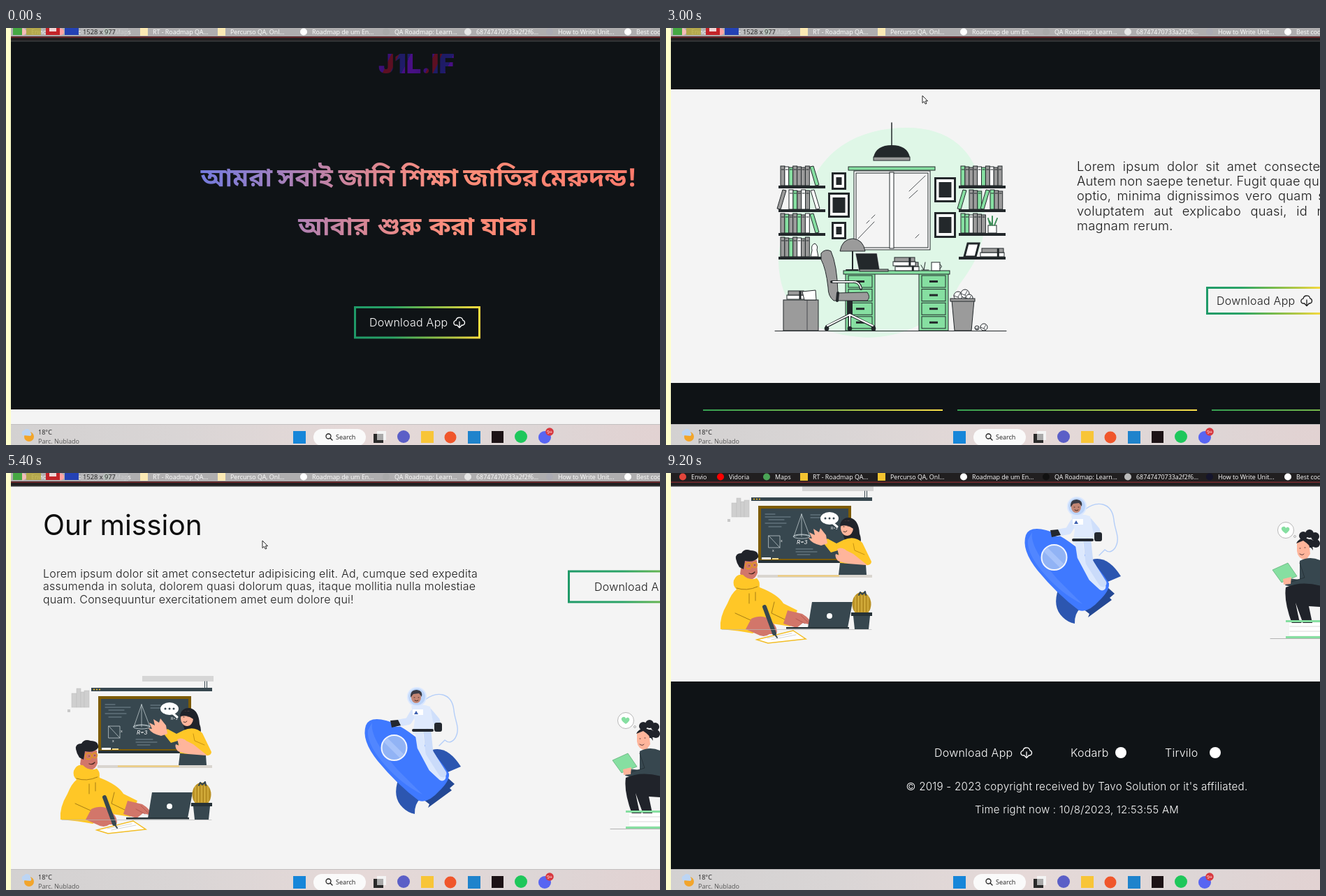
An HTML page that plays this animation: 936x598 px, repeating every 9300 ms.

```html
<!DOCTYPE html>
<html lang="en">
<head>
<meta charset="utf-8">
<style>
html, body { margin: 0; width: 100%; height: 100%; overflow: hidden; background: #f4f4f4; }
svg { display: block; width: 936px; height: 598px; font-family: Inter, "Open Sans", sans-serif; }
.body { font-weight: 300; letter-spacing: .015em; white-space: pre; }
.ui { font-family: "Open Sans", "Noto Sans", sans-serif; }
.title { font: 600 36px "Noto Sans Bengali", "Noto Serif Bengali", "Noto Sans", sans-serif; text-anchor: middle; }
</style>
</head>
<body>
<svg id="stage" viewBox="0 0 936 598"></svg>
<script>
const LOOP = 9300;
const DARK = '#0f1316', LIGHT = '#f4f4f4', INK = '#23282b', GREEN = '#86dfa1', GREY = '#9b9b9b';
const SLATE = '#37474f', YELLOW = '#ffc727', SKIN = '#d2766a', PALE = '#ffb59b';

const rect = (x, y, w, h, fill, more = '') => `<rect x="${x}" y="${y}" width="${w}" height="${h}" fill="${fill}" ${more}/>`;
const circle = (x, y, r, fill, more = '') => `<circle cx="${x}" cy="${y}" r="${r}" fill="${fill}" ${more}/>`;
const oval = (x, y, rx, ry, fill, more = '') => `<ellipse cx="${x}" cy="${y}" rx="${rx}" ry="${ry}" fill="${fill}" ${more}/>`;
const shape = (d, fill, more = '') => `<path d="${d}" fill="${fill}" ${more}/>`;
const line = (d, color, w = 1) => `<path d="${d}" fill="none" stroke="${color}" stroke-width="${w}" stroke-linecap="round" stroke-linejoin="round"/>`;
const text = (x, y, size, fill, s, more = 'class="body"') => `<text x="${x}" y="${y}" font-size="${size}" fill="${fill}" ${more}>${s}</text>`;
const group = (y, s) => `<g transform="translate(0 ${y})">${s}</g>`;
const edge = `stroke="${INK}" stroke-width="1"`;

const gradient = (id, stops, more = '') => `<linearGradient id="${id}" ${more}>` +
  stops.map(([at, c]) => `<stop offset="${at}" stop-color="${c}"/>`).join('') + '</linearGradient>';

const defs = '<defs>' +
  gradient('lime', [[0, '#1f9a68'], [.3, '#2ba467'], [.55, '#6fb84e'], [.8, '#b9c944'], [1, '#fddc3f']]) +
  gradient('rule', [[0, '#36a052'], [.4, '#6cb44c'], [.7, '#b7c745'], [1, '#fbe04a']]) +
  gradient('sunset', [[0, '#757bdc'], [.12, '#907eca'], [.22, '#ae80b4'], [.35, '#cf8499'], [.48, '#ee8b86'], [.6, '#ff8d78'], [1, '#ff7b6c']],
    'gradientUnits="userSpaceOnUse" x1="280" x2="898" y1="0" y2="0"') +
  gradient('head', [[0, '#4a6cf7'], [.25, '#7f7bcf'], [.5, '#cb7f98'], [.68, '#f47d78'], [1, '#ff7b6b']]) +
  gradient('bar', [[0, '#d3d1d1'], [.25, '#d9d5d5'], [.55, '#e6d9d8'], [.8, '#ddd6d6'], [1, '#e2d2d2']]) +
  gradient('neon', [[0, '#480f84'], [.3, '#391073'], [.3, '#5c0f22'], [.48, '#5c0f22'], [.48, '#1e1c62'], [.75, '#1f1b6c'], [.75, '#480f84'], [1, '#480f84']],
    'gradientUnits="userSpaceOnUse" x1="533" y1="38" x2="583" y2="62" spreadMethod="repeat"') +
  `<clipPath id="view"><rect x="7" y="19" width="929" height="549"/></clipPath></defs>`;

const cloud = (x, y, c) => `<g transform="translate(${x} ${y})">` +
  line('M-3 4H-4.5A3.4 3.4 0 0 1-5-2.8A5 5 0 0 1 4.8-3.2A3.7 3.7 0 0 1 4.5 4H3M0-1V7M-3 4.5L0 7.5L3 4.5', c, 1.3) + '</g>';
const button = (x, y, w, h, tx, c) =>
  rect(x + 1.5, y + 1.5, w - 3, h - 3, 'none', 'stroke="url(#lime)" stroke-width="3"') +
  text(tx, y + h / 2 + 5.5, 16, c, 'Download App') + cloud(tx + 129, y + h / 2, c);

// Hero
const words = [['আমরা', 330], ['সবাই', 428], ['জানি', 516], ['শিক্ষা', 606], ['জাতির', 708], ['মেরুদন্ড!', 834]];
const words2 = [['আবার', 469], ['শুরু', 563], ['করা', 638], ['যাক।', 720]];
const title = (list, y) => list.map(([s, x]) => text(x, y, 36, 'url(#sunset)', s, 'class="title"')).join('');
const hero = rect(7, 0, 929, 547, DARK) +
  text(533, 65, 38, 'url(#neon)', 'J1L.IF', 'font-weight="900"') +
  title(words, 227) + title(words2, 297) + button(498, 399, 181, 46.5, 520, '#fff');

// Study room
const tone = { g: GREEN, a: GREY, w: '#fff' };
const books = (x, y, list) => [...list].map((k, i) =>
  rect(x + i * 5.9, y - 28 + i % 3, 5.9, 28 - i % 3, tone[k], edge) + line(`M${x + i * 5.9 + 1.5} ${y - 23}h3`, INK)).join('');
const lean = (x, y, fill, dir = 1) => shape(`M${x} ${y - 27}l${5 * dir}-1l${8 * dir} 27l${-5 * dir} 1z`, fill, edge);
const picture = (x, y, w, h) => rect(x, y, w, h, INK) + rect(x + 3, y + 3, w - 6, h - 6, '#fff') + rect(x + 6.5, y + 7, w - 13, h - 14, INK);
const drawers = x => rect(x, 352, 42, 82, GREEN, edge) + [0, 1, 2, 3].map(i =>
  rect(x + 4, 355 + i * 19.6, 34, 17, GREEN, edge) + rect(x + 15, 362 + i * 19.6, 12, 3, INK)).join('');
const pile = (x, y, w) => rect(x, y - 6, w, 6, '#fff', edge) + rect(x + 2, y - 12, w - 3, 6, GREY, edge) + rect(x + w * .7, y - 12, 3, 12, INK);
const ball = (x, y, r) => circle(x, y, r, '#fff', edge) + line(`M${x - r} ${y}l${r} 2l${r / 2}-${r}M${x} ${y + 2}l2 ${r - 3}`, INK, .8);
const room =
  shape('M161 330C163 280 197 240 217 205C243 163 290 143 345 143C405 143 444 175 453 235C463 300 448 330 420 368C390 425 335 443 290 444C200 440 161 400 161 330Z', '#dff7e7') +
  line('M323 136V170', INK, 1.5) + shape('M297 185Q301 168 323 168Q345 168 349 185Z', INK) + rect(297, 185, 52, 5, GREY, edge) +
  rect(269, 205, 109, 113, '#fff', edge) + rect(272, 208, 103, 107, LIGHT, edge) + rect(320, 207, 6, 109, '#fff', edge) +
  line('M348 234L371 212M348 244L360 233M275 302L298 278M294 273L299 268M287 280L291 276M357 301L362 296', INK, .8) +
  rect(261, 199, 124, 5, GREEN, edge) +
  picture(237, 207, 21, 25) + picture(232, 236, 31, 36) + picture(237, 278, 21, 25) + picture(384, 214, 31, 36) + picture(384, 264, 31, 37) +
  [227, 261, 295, 329].map(y => rect(161, y - 1, 67, 4, INK) + rect(419, y - 1, 67, 4, INK)).join('') +
  books(164, 226, 'awgaaaa') + lean(206, 226, GREEN) + books(176, 260, 'wgawa') + lean(172, 260, GREY, -1) + lean(207, 260, '#fff') +
  books(164, 294, 'agaagaw') + lean(206, 294, GREEN) + books(164, 328, 'aagawaa') +
  shape('M207 328l2-9q-2-8 4-10q5 3 3 9l2 10z', '#fff', edge) +
  books(422, 226, 'gaaawgawaa') + books(434, 260, 'aag') + lean(430, 260, GREEN, -1) + lean(463, 260, GREEN, -1) + books(464, 260, 'gaa') +
  books(422, 294, 'ggwaaa') + rect(461, 283, 12, 11, '#fff', edge) + line('M467 283V270M464 283L461 273M470 283L474 273M466 282L463 277', '#3f8f5a', 2) +
  shape('M432 309h16l-5 19h-16z', '#fff', `stroke="${INK}" stroke-width="3"`) + pile(450, 328, 34) +
  rect(168, 390, 50, 44, GREY, edge) + line('M202 391V433', INK, .7) + pile(173, 389, 25) + shape('M195 378l19-2l1 14h-17z', '#fff', edge) +
  drawers(257) + drawers(362) + rect(254, 348, 152, 5, GREEN, edge) +
  line('M267 320V347M258 347H276', INK, 2) + shape('M249 320Q252 303 267 302Q282 303 285 320Z', GREY, edge) +
  shape('M271 323h31l4 25h-30z', INK, 'stroke="#fff" stroke-width=".6"') + rect(277, 346, 41, 3, GREY, edge) +
  pile(328, 348, 34) + pile(325, 341, 32) + line('M365 340l4 7l2-11M366 347h10', INK) + rect(380, 336, 12, 12, '#fff', edge) + line('M392 339q5 3 0 6', INK) +
  shape('M222 323Q228 316 236 320Q245 340 246 380L288 379Q293 386 288 391H240Q232 385 232 372Q229 345 222 332Z', GREY, edge) +
  line('M246 380L245 391M237 364H268Q277 363 279 374', INK, 4) + line('M239 364H267Q276 363 279 373', '#fff', 1.8) +
  rect(259, 391, 8, 24, INK) + line('M263 411L230 428M263 411L297 428M263 411V430', INK, 4) + line('M263 411L231 427M263 411L296 427M263 412V428', '#fff', 2) +
  [230, 263, 297].map(x => circle(x, 431, 3.3, INK)).join('') +
  ball(418, 384, 6) + ball(428, 381, 6) + ball(434, 387, 5) + ball(455, 429, 5) + ball(445, 430, 3) +
  shape('M409 390h32l-4 44h-24z', GREY, edge) + rect(407, 388, 35, 4, GREY, edge) + line('M156 434.5H487', INK);
const lorem = [['Lorem ipsum dolor sit amet consectetur', 5], ['Autem non saepe tenetur. Fugit quae quas', -.5],
  ['optio, minima dignissimos vero quam sed', 3], ['voluptatem aut explicabo quasi, id nam', 8], ['magnam rerum.', 0]];
const intro = rect(7, 547, 929, 421, LIGHT) + group(459, room) +
  lorem.map(([s, gap], i) => text(588, 663.5 + i * 21.4, 18.3, '#1c1c1c', s, `class="body" style="word-spacing:${gap}px"`)).join('') +
  button(773, 830, 168, 40, 788, '#1c1c1c');

// Cards
const para = ['Lorem ipsum dolor, sit amet consectetur', 'adipisicing elit. Explicabo, in facere atque', 'totam iste esse. Libero praesentium natus vel',
  'quibusdam? Magni provident obcaecati', 'earum, non quibusdam autem officia', 'numquam dolor nihil cum molestias vitae', 'pariatur.'];
const card = (x, s) => rect(x, 1006, 343, 2, 'url(#rule)') + text(x, 1049, 28, 'url(#head)', s, 'font-weight="350"') +
  para.map((p, i) => text(x, 1085.5 + i * 18.35, 15.5, '#f4f4f4', p, `class="body${i < 6 ? ' justify' : ''}"`)).join('');
const cards = rect(7, 968, 929, 229, DARK) + card(53, "We don't collect data") + card(417, 'Subscription not apply') + card(781, 'Spam &amp; ads free');

// Mission
const lesson =
  rect(195, 291, 102, 8, '#d6d6d6') + line('M284.5 299V308M287.5 299V308', SLATE) + rect(122, 308, 173, 5, SLATE) +
  [126, 130, 134].map(x => circle(x, 310.5, 1, YELLOW)).join('') +
  [[94, 316, 7], [101, 309, 6], [107, 314, 5], [112, 312, 7]].map(([x, y, w]) => rect(x, y, w, 336 - y, '#cfcfcf', 'stroke="#bdbdbd" stroke-width=".5"')).join('') +
  rect(88, 339, 4, 4, '#c8c8c8') +
  rect(132, 320, 133, 80, '#7d5b05') + rect(136, 324, 125, 72, SLATE) + rect(132, 398, 136, 4, '#263238') + rect(137, 394, 13, 3, '#fff') + rect(152, 395, 9, 2, '#f4d98a') +
  line('M194 332L183 364M194 332L206 364M194 332V364M183 364Q194 359 206 364M147 363h16v17h-16zM147 363l16 17', '#cfd8dc', .7) + oval(194, 364, 12, 3, 'none', 'stroke="#cfd8dc" stroke-width=".8"') +
  line('M142 332h14M142 336h36M147 340h22M142 345h30M147 350h18M207 333h14M207 337h28M186 382h24M186 386h30M188 390h18', '#90a4ae', .7) +
  text(187, 375, 8, '#fff', 'R=3', 'font-style="italic"') + text(164, 372, 5, '#fff', 'x', '') + text(152, 386, 5, '#fff', 'x', '') + text(236, 354, 5, '#fff', 'R=3', '') +
  oval(234, 338, 13, 9, '#fff') + line('M239 345l6 5', '#fff', 3) + [228, 234, 240].map(x => circle(x, 338, 1.5, SLATE)).join('') +
  shape('M249 347Q252 336 263 337Q276 340 277 360Q282 372 274 379L258 376Z', '#20232a') +
  oval(259, 352, 9, 11, PALE) + shape('M250 345Q257 338 266 343L271 356Q262 346 250 349Z', '#20232a') + line('M254 357q3 2 5-1M254 350h1M260 349h1', '#452f2b', 1) +
  shape('M254 369Q270 362 281 373L294 400Q294 406 285 405L249 403L246 384L236 387L225 373L231 367L244 374Z', YELLOW) +
  shape('M231 374L222 377Q208 374 204 366L209 367L205 358L213 362L211 353L219 358L221 352L229 362Z', PALE) +
  shape('M288 405Q266 406 246 399Q241 394 243 389L248 391L245 382Q251 378 258 384L268 389Z', PALE) +
  line('M268 374L270 384L284 390', '#c79212', 1) + shape('M249 402L286 405L287 419H247Z', SLATE) +
  rect(131, 419, 164, 4, '#d9d5cf') + rect(160, 419.5, 88, 2, '#f1cc74') +
  shape('M108 403Q114 395 130 398L131 416Q127 429 115 425L106 418Z', SKIN) + shape('M100 396Q99 388 108 388Q112 381 121 384Q133 384 132 394Q126 402 113 399L111 411L105 408Q101 402 100 396Z', '#20232a') +
  circle(118, 406, 4.5, 'none', 'stroke="#e09b18" stroke-width="1.3"') + circle(127, 405, 3.5, 'none', 'stroke="#e09b18" stroke-width="1.3"') + line('M119 417q5 2 8-2M119 406h.1M127 405h.1', '#4b2924', 1.3) +
  shape('M97 427Q101 417 110 419Q119 428 130 424L134 437Q160 447 168 460L188 470L178 493L152 489L124 503Q105 499 78 497Q76 480 88 460Q94 445 101 440Q95 434 97 427Z', YELLOW) +
  shape('M99 435Q110 444 133 437Q136 430 130 424', YELLOW) + line('M101 438Q115 443 131 436M99 474L121 484M155 458L151 474L174 485M119 446V460M128 444V456', '#9b7414', .9) +
  shape('M130 512L182 499L200 511L146 517Z', '#fff', 'stroke="#f2bd26" stroke-width="1.5"') + line('M145 510l35-7M151 512l35-7', '#c9c9c9', .8) +
  shape('M122 482Q140 474 151 486Q161 495 158 504L148 504Q140 510 130 504L114 497Z', SKIN) + line('M141 465L155 503', SLATE, 6) + line('M155 503l4 6', SLATE, 2) +
  shape('M174 470L195 475Q207 482 208 491L196 488L187 495L168 489Z', SKIN) + line('M186 482l13 7M193 477l10 10', '#a85049', .7) +
  shape('M209 458H267L260 495H203Z', SLATE) + circle(234, 478, 4, '#fff') + rect(172, 494, 90, 2.5, '#263238') +
  oval(280, 461, 13.5, 17, '#b99125') + [271, 275.5, 280, 284.5, 289].map(x => line(`M${x} 449V472`, '#f3cf58', .8)).join('') + line('M276 448l2-4l3 3l4-4l1 5', SLATE, 2) +
  rect(265, 473, 30, 5, '#263238') + shape('M268 478H292L290 497H270Z', SLATE) + line('M80 497.5H294', '#b9b9b9', .7);
const rocket =
  shape('M610 397Q632 391 651 421L630 430Z', '#2c56b0') + shape('M562 438Q552 465 568 480Q575 487 585 489Q584 475 594 466Z', '#2c56b0') + shape('M597 468L632 437L642 446L635 452L638 455L604 480L606 475Z', '#244894') +
  shape('M515 362Q520 349 544 355Q568 361 602 392Q620 409 634 431Q635 442 620 456Q604 474 591 470Q560 447 532 413Q508 383 515 362Z', '#3f79ff') +
  shape('M524 358Q520 380 560 425L596 461Q565 446 538 414Q516 387 518 369Z', '#6293ff', 'opacity=".55"') +
  circle(555.5, 394, 18, '#91b3f5', 'stroke="#f2f6ff" stroke-width="2"') + shape('M546 380l23 23l-5 6l-24-24z', '#b5cdfd', 'opacity=".6"') +
  line('M600 325C617 312 638 315 641 340C642 355 651 366 643 380Q636 390 628 383L620 391', '#b4cef9', 1.4) +
  line('M583 344L576 356L560 359', '#d7e4fc', 10) + line('M605 342L616 355L618 364', '#cfdffb', 10) + shape('M580 334Q595 330 607 335L613 366L607 374H582L585 355Z', '#dfeafd') +
  line('M591 373L594 393L610 423L624 436', '#dce8fd', 11) + line('M603 372L606 401L625 431', '#cadbfa', 11) + line('M583 369L610 369', '#23282f', 4) +
  shape('M550 355l11-1l4 8l-13 3z', '#23282f') + rect(613, 358, 11, 13, '#23282f', 'rx="3"') +
  circle(588, 321, 13, '#bdd5fa', 'stroke="#dbe8ff" stroke-width="2"') + oval(587, 322, 7, 8, '#c38674') + shape('M579 322Q578 311 588 311Q597 312 595 321L591 316L583 317Z', '#3a3b45') + line('M584 322h1M590 322h1M585 326q3 2 5 0', '#4a302a', 1) +
  rect(582, 339, 15, 8, '#fff') + shape('M584 346l3-5l3 5z', '#3c5fb0');
const reader =
  circle(887, 355, 11.5, '#fff', 'stroke="#9a9a9a" stroke-width=".7"') + circle(900, 364, 1.5, 'none', 'stroke="#999" stroke-width=".7"') +
  shape('M887 360Q877 353 883 350Q886 349 887 352Q890 349 892 352Q894 355 887 360Z', GREEN) +
  [[912, 363], [921, 360], [929, 364], [930, 374], [922, 374]].map(([x, y]) => circle(x, y, 6, '#20232a')).join('') +
  shape('M903 373Q910 365 920 372L922 389L916 398Q904 396 903 385Z', PALE) + shape('M902 374Q909 361 924 370L926 384Q920 375 912 370Z', '#20232a') + line('M907 381h1M914 380h1M907 389q4 3 6 0', '#533', 1) +
  shape('M907 399Q922 391 938 399V442L907 439L886 434L890 424L907 426Z', SLATE) + line('M907 402L914 423L895 429', '#263238', 1) +
  shape('M868 412L890 402L903 421L881 430Z', GREEN, 'stroke="#59aa71" stroke-width=".7"') + shape('M883 425l12-3l-1 10l-10 1z', PALE) +
  shape('M887 437Q909 427 938 435V465L920 464L925 488L913 492L901 459L907 488L896 489Q884 457 887 437Z', '#20232a') + shape('M898 483l10 1l3 8l-12 4z', '#20232a') + shape('M914 485l11 1l-1 10h-11z', '#20232a') +
  rect(887, 484, 49, 3, GREEN) + rect(892, 488, 44, 18, '#fff') + line('M893 493H936M893 500H936', '#c8c8c8', .7) + rect(887, 507, 49, 3, GREEN) + line('M865 510.5H936', '#999', .7);
const goal = ['Lorem ipsum dolor sit amet consectetur adipisicing elit. Ad, cumque sed expedita',
  'assumenda in soluta, dolorem quasi dolorum quas, itaque mollitia nulla molestiae', 'quam. Consequuntur exercitationem amet eum dolore qui!'];
const mission = rect(7, 1197, 929, 599, LIGHT) + text(53, 1313, 40.5, '#0c0c0c', 'Our mission', '') +
  goal.map((s, i) => text(53, 1374 + i * 18.4, 16, '#1c1c1c', s)).join('') +
  button(804, 1363.5, 258, 47, 842, '#1c1c1c') + group(1224, lesson + rocket + reader);

// Footer
const footer = rect(7, 1796, 929, 280, DARK) + group(1497,
  text(384, 407, 16, '#fff', 'Download App') + cloud(516, 401, '#fff') + text(579, 407, 16, '#fff', 'Kodarb') + circle(651, 401, 8, '#fff') +
  text(714, 407, 16, '#fff', 'Tirvilo') + circle(786, 401, 8, '#fff') +
  text(588, 455, 15.2, '#fff', "© 2019 - 2023 copyright received by Tavo Solution or it's affiliated.", 'class="body" text-anchor="middle"') +
  text(588, 488, 15, '#fff', '', 'id="clock" class="body" text-anchor="middle"'));

// Browser bar, recorder controls and taskbar
const marks = [['Envio', 36, '#e2453b'], ['Vidoria', 90, '#f00'], ['Maps', 156, '#4aa556'], ['RT - Roadmap QA...', 210, '#f4c430'], ['Percurso QA, Onl...', 321, '#f4c430'],
  ['Roadmap de um En...', 438, '#fff'], ['QA Roadmap: Learn...', 556, '#111'], ['68747470733a2f2f6...', 673, '#bbb'], ['How to Write Unit...', 790, '#15152c'], ['Best cod', 902, '#fff']];
const ui = 'class="ui"';
const browser = rect(7, 0, 929, 19, '#211f20') +
  marks.map(([s, x, c], i) => (i == 3 || i == 4 ? rect(x - 18, 0, 11, 11, c) : circle(x - 12, 5.5, 5, c)) + text(x, 9, 8.9, '#fff', s, ui)).join('') +
  rect(7, 12.5, 929, 1.5, '#792b2e') + rect(7, 18, 929, 1.5, '#3b3d3f');
const recorder = '<g id="recorder">' + rect(7, 0, 929, 12, '#fff', 'opacity=".64"') +
  rect(10, 0, 13, 10, '#46a843') + rect(29, 0, 21, 10, '#b5a52b', 'opacity=".75"') + rect(57, 0, 20, 10, '#c3252a') + rect(62, 0, 10, 5, '#efd5d5') + rect(84, 0, 20, 10, '#2442b4') +
  rect(107, 0, 68, 12, '#b9b9bb', 'opacity=".7"') + text(110, 9, 9.3, '#222', '1528 x 977', ui) + '</g>';
const taskbar = rect(7, 568, 929, 30, 'url(#bar)') + rect(7, 568, 929, 1, '#c2bfbf') +
  circle(33, 586, 7, '#f2a52b') + shape('M24 584a4 4 0 0 1 2-7a5 5 0 0 1 9 3a3 3 0 0 1 0 5z', '#bcd5f4') +
  text(46, 583, 9, '#222', '18°C', ui) + text(46, 595.5, 9, '#555', 'Parc. Nublado', ui) + rect(411, 578, 18, 18, '#1686d9') +
  rect(440, 575, 75, 24, '#fafafa', 'rx="12"') + circle(461.5, 585.5, 3.5, 'none', 'stroke="#222" stroke-width="1.3"') + line('M464 588l3 3', '#222', 1.4) + text(472, 590, 9, '#222', 'Search', ui) +
  rect(531, 578, 13, 13, '#f3f3f3') + rect(526, 582, 14, 13, '#2a2a2a') + rect(531, 582, 9, 9, '#aaa') +
  circle(569, 586, 9, '#5b5fc7') + rect(594, 578, 18, 17, '#f8c537') + circle(636, 587, 8.5, '#f0562b') + rect(661, 578, 18, 18, '#1f83cc') +
  rect(695, 578, 17, 17, '#1c1215') + circle(737, 586, 9, '#1ec75b') + circle(771, 587, 9, '#5865f2') +
  circle(778, 579, 5.8, '#d8383f') + text(778, 582, 7, '#fff', '9+', 'class="ui" text-anchor="middle"');

const stage = document.getElementById('stage');
stage.innerHTML = defs + rect(0, 0, 936, 598, LIGHT) +
  `<g clip-path="url(#view)"><g id="page">${hero + intro + cards + mission + footer}</g></g>` +
  browser + recorder + taskbar + rect(0, 0, 7, 598, '#ffffcc', 'id="strip"') +
  '<path id="cursor" d="M0 0V10.5L2.5 8.3L4.2 12L6 11.2L4.4 7.7H7.5Z" fill="#fff" stroke="#111" stroke-width=".9"/>';

const $ = id => document.getElementById(id);
const page = $('page'), cursor = $('cursor'), clock = $('clock'), neon = $('neon'), strip = $('strip'), rec = $('recorder');

for (const el of document.querySelectorAll('.justify')) {
  const gaps = el.textContent.split(' ').length - 1;
  el.style.wordSpacing = (343 - el.getComputedTextLength()) / gaps + 'px';
}

// Wheel bursts: start time, then the offset at each 100 ms step
const bursts = [[0, 0], [1300, 30, 100, 126], [2300, 133, 210, 282, 306], [2900, 405, 459], [3400, 490, 590, 612], [4000, 640, 745, 765],
  [4600, 774, 870, 918], [5200, 1010, 1165, 1224], [5800, 1335, 1376], [6100, 1377], [6300, 1414, 1465, 1491, 1497]];
const scrollAt = t => {
  const [start, ...steps] = bursts.findLast(b => b[0] <= t);
  return steps[Math.min(steps.length - 1, Math.floor((t - start) / 100))];
};
const ease = u => (u = Math.max(0, Math.min(1, u)), u * u * (3 - 2 * u));
const cursorAt = t => {
  const a = t < 7400 ? ease((t - 100) / 900) : 1 - ease((t - 7400) / 600);
  const home = t < 7400 ? 60 : t < 8500 ? 21 : 51;
  return [home + (367 - home) * a, 97 * a];
};

function draw(time) {
  const t = Math.floor(time % LOOP / 100) * 100;
  const [x, y] = cursorAt(t);
  page.setAttribute('transform', `translate(0 ${-scrollAt(t)})`);
  cursor.setAttribute('transform', `translate(${x} ${y})`);
  cursor.setAttribute('visibility', t < 100 || t >= 9200 ? 'hidden' : 'visible');
  rec.setAttribute('visibility', t >= 9200 ? 'hidden' : 'visible');
  strip.setAttribute('fill', t >= 5900 && t < 7500 ? '#f8f8f5' : '#ffffcc');
  neon.setAttribute('gradientTransform', `translate(${Math.min(t, 1100) / 100 * 17} 0)`);
  clock.textContent = `Time right now : 10/8/2023, 12:53:${52 + Math.max(0, Math.floor((t - 5600) / 1000))} AM`;
}

const began = performance.now();
function tick() {
  draw(performance.now() - began);
  requestAnimationFrame(tick);
}
tick();
</script>
</body>
</html>
```
